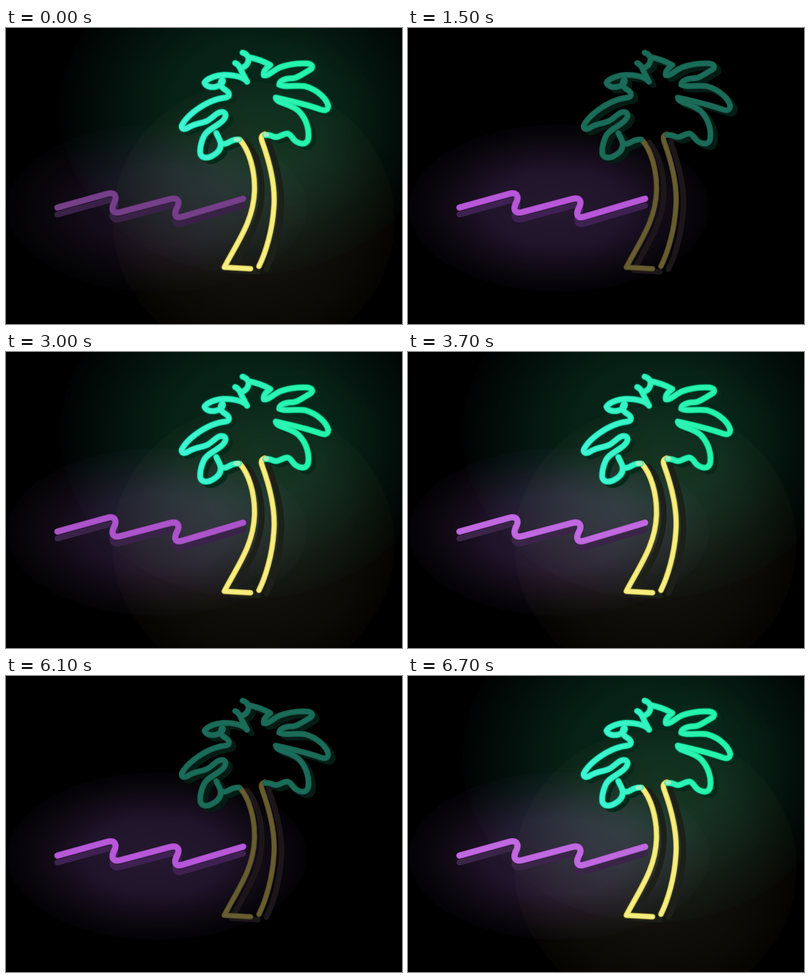
Recreate the animation shown at these times as an HTML page. Size 800 by 600 pixels, loop 7300 ms.

```html
<!DOCTYPE html>
<html lang="en">
<head>
<meta charset="utf-8">
<title>Neon palm</title>
<style>
html, body { margin: 0; width: 100%; height: 100%; overflow: hidden; background: #000; }
svg { display: block; width: 100vw; height: 100vh; }
.glow { mix-blend-mode: screen; }
.tube { fill: none; stroke-linecap: round; stroke-linejoin: round; }
</style>
</head>
<body>
<svg viewBox="0 0 800 600">
  <defs>
    <radialGradient id="greenGlow">
      <stop offset="0" stop-color="#062417"/>
      <stop offset=".4" stop-color="#062217"/>
      <stop offset=".62" stop-color="#041710"/>
      <stop offset=".8" stop-color="#020d09"/>
      <stop offset="1" stop-color="#010303"/>
    </radialGradient>
    <radialGradient id="yellowGlow">
      <stop offset="0" stop-color="#14130d"/>
      <stop offset=".4" stop-color="#11100a"/>
      <stop offset=".75" stop-color="#0b0a05"/>
      <stop offset="1" stop-color="#050402"/>
    </radialGradient>
    <radialGradient id="purpleGlow">
      <stop offset="0" stop-color="#25182f"/>
      <stop offset=".45" stop-color="#20142b"/>
      <stop offset=".65" stop-color="#150c1b"/>
      <stop offset=".85" stop-color="#09070c"/>
      <stop offset="1" stop-color="#030205"/>
    </radialGradient>
    <linearGradient id="leafRim" gradientUnits="userSpaceOnUse" x1="370" y1="200" x2="600" y2="160">
      <stop offset="0" stop-color="#1fe2bd"/>
      <stop offset="1" stop-color="#13da96"/>
    </linearGradient>
    <linearGradient id="leafLight" gradientUnits="userSpaceOnUse" x1="370" y1="200" x2="600" y2="160">
      <stop offset="0" stop-color="#40f5d4"/>
      <stop offset="1" stop-color="#26f4ac"/>
    </linearGradient>
    <filter id="soft" x="-10%" y="-10%" width="120%" height="120%"><feGaussianBlur stdDeviation=".7"/></filter>
    <filter id="halo" x="-20%" y="-20%" width="140%" height="140%"><feGaussianBlur stdDeviation="1.5"/></filter>

    <path id="leaves" d="M478 50C485 52 491 58 490 64C489 74 484 78 474 82
      M463 71C472 75 474 84 478 92L487 109C480 99 460 95 440 95C423 96 405 103 401 111C404 119 414 121 424 119C435 116 441 109 437 104
      M435 107C431 116 437 122 444 126C452 131 453 139 444 141C405 145 365 177 355 198C354 206 361 206 368 202C383 192 396 194 407 188C421 180 428 167 440 171C448 176 441 186 433 192C422 201 406 207 400 219C393 233 391 249 393 256C397 265 408 264 417 259C430 252 436 243 433 231C431 223 427 219 425 213
      M433 231C438 238 446 234 453 230C460 226 465 226 470 226
      M489 59C507 62 521 68 534 75C525 82 519 88 521 96C529 98 539 87 553 80C572 73 592 71 609 72C621 74 621 81 612 86C599 93 588 102 578 102C564 102 552 107 552 115C564 121 583 115 604 118C632 126 648 145 651 158C650 168 643 168 635 165C607 155 577 148 545 141C546 153 573 152 591 168C607 184 614 208 610 227C605 238 594 235 586 230C578 225 577 216 569 214C557 214 552 224 540 220C534 217 530 216 524 217"/>
    <path id="trunk" d="M472 226C490 246 503 285 502 330C500 390 470 430 441 485L494 488
      M523 215C515 218 515 223 517 229C532 270 545 320 541 365C538 410 525 455 511 483"/>
    <path id="wave" d="M104 364L205 336C220 332 225 342 218 355C211 370 218 377 232 373L330 347C348 342 352 352 345 365C338 380 343 387 358 382L479 346"/>
  </defs>

  <rect width="800" height="600"/>
  <g id="glowOn">
    <ellipse class="glow" cx="495" cy="165" rx="385" ry="335" fill="url(#greenGlow)"/>
    <ellipse class="glow" cx="570" cy="210" rx="190" ry="190" fill="url(#greenGlow)" opacity=".15"/>
    <ellipse class="glow" cx="500" cy="390" rx="285" ry="280" fill="url(#yellowGlow)"/>
  </g>
  <ellipse id="haze" class="glow" cx="305" cy="365" rx="303" ry="170" fill="url(#purpleGlow)"/>

  <g class="tube" filter="url(#soft)">
    <use id="waveShade" href="#wave" y="14" stroke-width="12"/>
    <use id="leafShade" href="#leaves" x="9" y="7" stroke-width="12"/>
    <use id="trunkShade" href="#trunk" x="15" y="6" stroke-width="11"/>
  </g>
  <g id="halos" class="tube" filter="url(#halo)">
    <use href="#leaves" stroke="#086a48" stroke-width="13"/>
    <use href="#trunk" stroke="#4d4722" stroke-width="12"/>
  </g>
  <g class="tube" filter="url(#soft)">
    <use id="waveEdge" href="#wave" stroke-width="13"/>
    <use id="waveCore" href="#wave" stroke-width="10"/>
    <use id="trunkEdge" href="#trunk" stroke-width="11"/>
    <use id="trunkCore" href="#trunk" stroke-width="7.5"/>
    <use id="leafEdge" href="#leaves" stroke-width="12"/>
    <use id="leafCore" href="#leaves" stroke-width="8.5"/>
    <path id="joints" d="M464 226L470 226M524 216L527 216" stroke="#9df0c0" stroke-width="9"/>
  </g>
</svg>
<script>
const el = id => document.getElementById(id);
const LOOP = 7300;

const palmOn = {
  leafEdge: 'url(#leafRim)', leafCore: 'url(#leafLight)', leafShade: '#06291a',
  trunkEdge: '#d8cc5c', trunkCore: '#f6ee80', trunkShade: '#1c2018'
};
const palmOff = {
  leafEdge: '#155c4b', leafCore: '#1a6c59', leafShade: '#051c14',
  trunkEdge: '#534a25', trunkCore: '#685d30', trunkShade: '#1c161a'
};
const purple = (edge, core, shade, haze) =>
  ({ waveEdge: edge, waveCore: core, waveShade: shade, haze });

const looks = {
  full: { lit: 1, ...palmOn, ...purple('#b25bd1', '#c069e0', '#3a2548', 1) },
  mid: { lit: 1, ...palmOn, ...purple('#9c48b8', '#ac54cb', '#3a2349', .88) },
  dim: { lit: 1, ...palmOn, ...purple('#683579', '#763f8a', '#392147', .6) },
  off: { lit: 0, ...palmOff, ...purple('#a64cc6', '#b758d8', '#3e2150', 1) }
};

// Flicker schedule: start time in ms and look
const cues = [
  [0, 'dim'], [100, 'off'], [200, 'full'],
  [1500, 'off'], [1600, 'full'],
  [1900, 'dim'], [2000, 'off'], [2100, 'full'],
  [3000, 'mid'], [3100, 'full'],
  [3500, 'dim'], [3600, 'off'], [3700, 'full'],
  [4500, 'dim'], [4600, 'mid'], [4700, 'full'],
  [6100, 'off'], [6200, 'full'],
  [6600, 'off'], [6700, 'full']
];

let shown = '';
function render(ms) {
  const t = ms % LOOP;
  const name = cues.filter(c => c[0] <= t).pop()[1];
  if (name === shown) return;
  shown = name;
  const { lit, haze, ...strokes } = looks[name];
  for (const id in strokes) el(id).setAttribute('stroke', strokes[id]);
  el('haze').setAttribute('opacity', haze);
  for (const id of ['glowOn', 'halos', 'joints']) el(id).setAttribute('opacity', lit);
}

function tick() {
  render(performance.now());
  requestAnimationFrame(tick);
}
tick();
</script>
</body>
</html>
```
